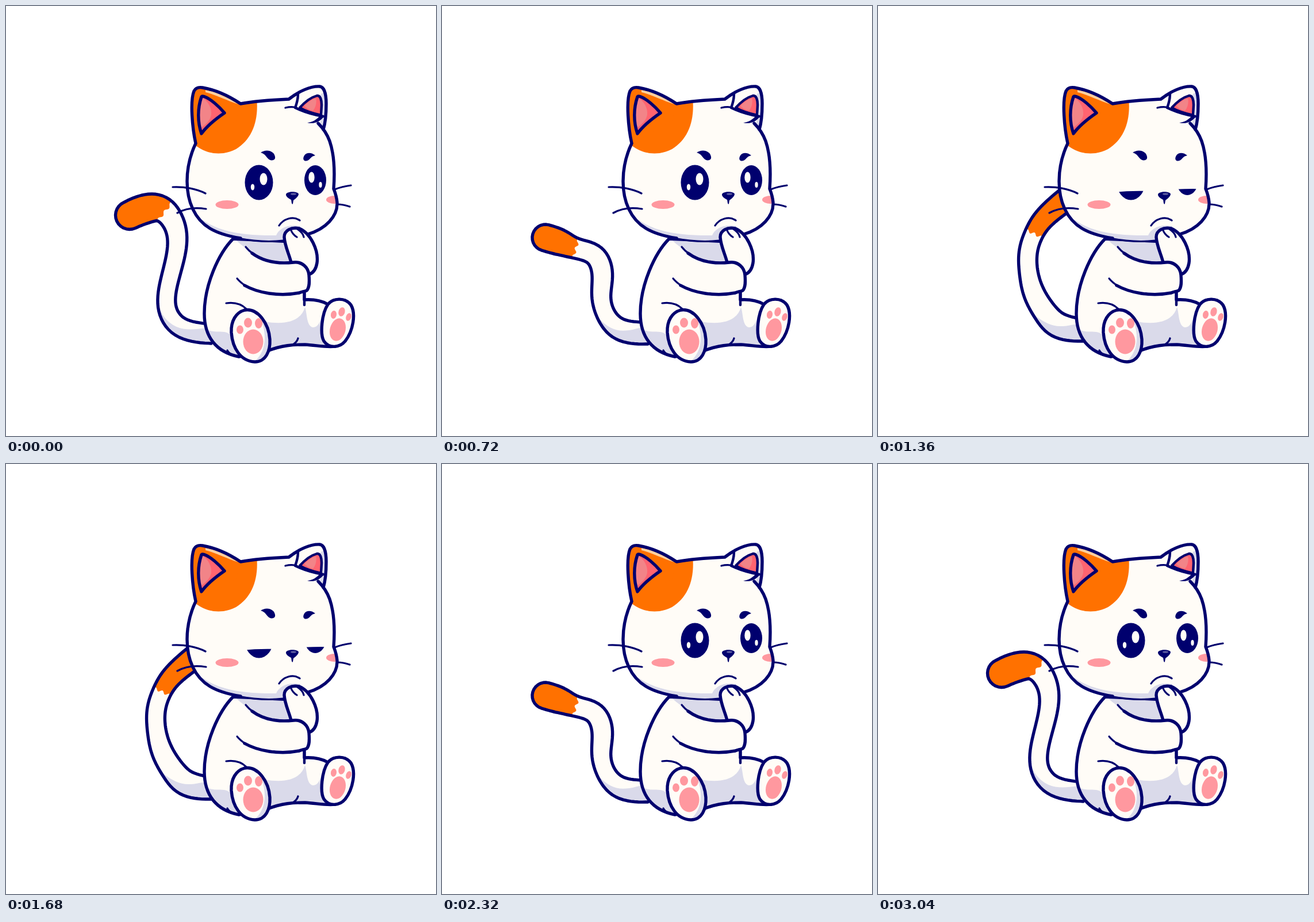
Recreate the animation shown at these times as an HTML page. Size 748 by 748 pixels, loop 3120 ms.

```html
<!DOCTYPE html>
<html lang="en">
<head>
<meta charset="utf-8">
<title>Thinking cat</title>
<style>
  html, body { margin: 0; width: 100%; height: 100%; overflow: hidden; background: #fff; }
  svg { display: block; width: 100vw; height: 100vh; fill: none; stroke-linecap: round; stroke-linejoin: round; }
  .line { stroke: #00006e; stroke-width: 5.4; }
  .mid { stroke-width: 4.4; }
  .thin { stroke-width: 3.2; }
  .fur { fill: #fffcf7; }
  .shade { fill: #dadaea; }
  .orange { fill: #ff7100; }
  .peach { fill: #ffd0a0; }
  .ink { fill: #00006e; }
  .gloss { fill: #5c5ca0; }
  .pink { fill: #ff989f; }
  .rose { fill: #ff6470; }
  .dusk { fill: #f28488; }
</style>
</head>
<body>
<svg viewBox="0 0 748 748">
  <defs>
    <path id="headShape" d="M330 239C319 262 315 285 315 305C315 340 328 371 355 387C390 405 440 411 482 408L525 397C556 388 577 366 576 342C575 330 572 323 570 318C572 290 571 258 563 235C558 221 550 211 543 204L552 193L503 177L508 152C503 156 498 160 492 163C470 163 435 166 408 170Z"/>
    <path id="bodyShape" d="M395 405C370 430 345 485 345 535C345 575 365 602 405 610L455 600C480 590 500 589 520 589C540 590 556 594 573 592L560 519C548 512 535 510 519 511L519 495L500 410Z"/>
    <path id="footShape" d="M415 529C400 533 391 548 392 568C394 595 408 618 433 619C452 619 460 600 459 580C457 552 438 525 415 529Z"/>
    <path id="earInner" d="M340 158C333 178 333 202 340 222C350 208 364 197 380 186C370 174 356 162 346 158C343 157 341 156 340 158Z"/>
    <clipPath id="headClip"><use href="#headShape"/></clipPath>
    <clipPath id="bodyClip"><use href="#bodyShape"/></clipPath>
    <clipPath id="footClip"><use href="#footShape"/></clipPath>
    <clipPath id="lidLeft"><path id="lidLeftShape"/></clipPath>
    <clipPath id="lidRight"><path id="lidRightShape"/></clipPath>
  </defs>

  <g id="tail">
    <path id="tailFur" class="fur"/>
    <path id="tailShade" class="shade"/>
    <path id="tailTip" class="orange"/>
    <path id="tailLine" class="line"/>
  </g>

  <g id="body">
    <use href="#bodyShape" class="fur"/>
    <g clip-path="url(#bodyClip)" class="shade">
      <path d="M396 404C420 425 445 446 500 448L500 400Z"/>
      <path d="M340 556C360 577 384 556 394 578L420 630H340Z"/>
      <path d="M450 549C490 556 514 546 520 524C524 533 522 557 534 559C546 558 545 546 552 538L580 610H440Z"/>
    </g>
    <use href="#bodyShape" class="line"/>
    <path class="line mid" d="M519 497V520"/>
    <path class="line thin" d="M383 517C397 515 409 518 418 527M385 599C387 603 390 605 393 607M499 589C504 586 507 582 508 578"/>
  </g>

  <g id="feet">
    <use href="#footShape" class="fur"/>
    <path class="shade" clip-path="url(#footClip)" d="M440 535C457 575 452 604 428 622H470V535Z"/>
    <use href="#footShape" class="line"/>
    <path class="fur line" d="M560 519C570 507 590 507 600 520C609 535 604 565 590 583C580 595 562 596 553 583C546 571 549 535 560 519Z"/>
    <g class="pink">
      <ellipse cx="430" cy="584" rx="17.5" ry="21.5"/>
      <ellipse cx="407" cy="563" rx="6" ry="7.5"/>
      <ellipse cx="421" cy="551" rx="7" ry="8.5"/>
      <ellipse cx="439.5" cy="552" rx="6.5" ry="9"/>
      <ellipse cx="577" cy="563" rx="13.5" ry="20" transform="rotate(15 577 563)"/>
      <ellipse cx="570" cy="537" rx="5" ry="7" transform="rotate(10 570 537)"/>
      <ellipse cx="584" cy="532" rx="5.5" ry="8" transform="rotate(15 584 532)"/>
      <ellipse cx="596" cy="541" rx="4.5" ry="7" transform="rotate(20 596 541)"/>
    </g>
  </g>

  <g id="head">
    <use href="#headShape" class="fur"/>
    <g clip-path="url(#headClip)">
      <path class="shade" d="M322 352C350 392 410 400 470 399C474 388 490 378 512 383L525 415H310Z"/>
      <path class="orange" d="M436 160C440 200 428 232 400 249C375 262 345 258 325 238L330 160Z"/>
      <ellipse class="pink" cx="572" cy="337" rx="15" ry="7"/>
    </g>

    <path class="orange" d="M330 240C324 212 320 165 327 148C330 142 336 141 342 142C365 146 390 158 408 170L400 200Z"/>
    <path class="peach" d="M347 146C370 150 388 160 404 171C386 165 366 155 347 150Z"/>
    <use href="#earInner" class="rose"/>
    <path class="dusk" d="M342 160C352 166 358 178 357 189C355 200 347 206 339 212C335 196 335 176 342 160Z"/>
    <use href="#earInner" class="line"/>

    <path class="fur" d="M492 162C510 148 530 139 546 140C553 141 557 152 557 170C557 190 555 205 552 215L543 204L552 193L503 177L508 152Z"/>
    <path class="shade" d="M546 156C549 150 553 150 556 154L557 180L552 215L546 203L552 190Z"/>
    <path class="rose line mid" d="M511 177C519 168 530 159 541 156C547 155 549 164 549 172L548 190C534 187 521 183 511 177Z"/>
    <path class="dusk" d="M519 174C526 166 533 162 539 161C541 168 538 178 534 182C528 181 523 178 519 174Z"/>

    <path class="line" d="M330 239C319 262 315 285 315 305C315 340 328 371 355 387C370 396 390 401 408 404M525 397C556 388 577 366 576 342C575 330 572 323 570 318C572 290 571 258 563 235C558 221 550 211 543 204M330 239C324 212 320 165 327 148C330 142 336 141 342 142C365 146 390 158 408 170C435 165 470 163 492 162C510 148 530 139 546 140C553 141 557 152 557 170C557 190 555 205 552 215"/>
    <path class="line thin" d="M404 404C430 409 458 411 482 408M486 177C494 175 500 175 506 177"/>
    <path class="line mid" d="M508 153C508 161 506 169 503 177C518 184 533 189 552 192"/>
    <path class="ink" d="M553 192C547 201 536 206 524 203C533 202 540 198 545 192Z"/>

    <path class="ink" d="M443 255C450 250 460 250 466 257C469 262 469 267 465 268C459 270 455 265 452 261C449 257 446 256 443 255Z"/>
    <path class="ink" d="M538 260C532 255 523 254 519 260C516 265 517 269 521 269.5C526 270 529 265 532 262.5C534 261 536 261 538 260Z"/>

    <g clip-path="url(#lidLeft)">
      <ellipse class="ink" cx="440" cy="307" rx="24.5" ry="30.5"/>
      <ellipse class="fur" cx="448" cy="301" rx="6.5" ry="10.5"/>
      <ellipse class="fur" cx="429" cy="315" rx="3.2" ry="5.5"/>
    </g>
    <g clip-path="url(#lidRight)">
      <ellipse class="ink" cx="538" cy="303" rx="19" ry="26"/>
      <ellipse class="fur" cx="531.5" cy="298" rx="5.2" ry="9.5"/>
      <ellipse class="fur" cx="547" cy="311" rx="2.7" ry="5"/>
    </g>

    <path class="ink" d="M487 328C488 322 507 322 509 327C509 331 503 336 500 338L499 344Q498 346 497 343L496 337C492 335 487 332 487 328Z"/>
    <ellipse class="gloss" cx="500" cy="327" rx="5" ry="1.8"/>
    <path class="line thin" d="M475 382C482 371 499 364 511 373"/>
    <ellipse class="pink" cx="384.5" cy="345.5" rx="20" ry="7.5"/>
    <path class="line thin" d="M290 315C310 314 332 318 347 326M298 360C312 352 330 350 348 353M572 319C582 315 592 313 600 312M577 345C585 345 592 347 598 349"/>
  </g>

  <g id="arms">
    <path class="fur" d="M484 402C484 390 497 385 510 388C530 395 544 425 541 447C539 460 533 465 527 467L497 450C492 430 485 418 484 402Z"/>
    <path class="line" d="M496 446C492 430 485 418 484 402C484 390 497 384 510 387C530 395 544 425 541 447C539 459 533 465 527 467"/>
    <path class="line thin" d="M495 388C497 394 501 399 506 402M508 389C513 392 517 397 518 402"/>
    <path class="fur" d="M420 422C440 442 470 449 500 446C515 443 526 455 527 468C528 480 528 490 523 495C517 498 514 497 510 499C470 506 420 497 402 475Z"/>
    <path class="line" d="M428 430C447 444 473 449 500 446C515 444 526 455 527 468C528 480 528 490 523 495C518 497 514 497 510 499C475 506 438 499 415 486"/>
    <path class="line thin" d="M417 419C420 423 424 427 430 431M402 474C406 479 411 483 417 487"/>
  </g>
</svg>
<script>
  const FRAME = 80, FRAMES = 39, STEPS = 8, TIP_START = 6 * STEPS, SHADE_END = 18;

  // Tail centre line from base to tip: x, y, half width.
  const poses = [
    { at: 320, pts: [[358,570,17],[306,563,17],[279,528,15.5],[283,482,15.5],[295,437,16],[298,392,17.5],[277,355,21],[247,351,25],[215,364,24.5]] },
    { at: 720, pts: [[358,569,19],[313,566,19],[286,540,16],[276,504,16.5],[280,466,18],[267,432,18],[232,422,17],[206,411,22.5],[180,403,23]] },
    { at: 1040, pts: [[358,566,20],[313,563,22],[288,538,21],[273,503,20],[261.5,468,19.5],[249,433,19],[240,401,21],[238,368,26],[241,334,27]] },
    { at: 1360, pts: [[358,564,19],[315,558,22],[290,532,20],[271,500,18.5],[262,465,16],[260.5,429,16],[271,396,16],[291,366,18],[328,336,20]] }
  ];

  const el = id => document.getElementById(id);
  const setPath = (id, d) => el(id).setAttribute('d', d);
  const mix = (a, b, u) => a + (b - a) * u;
  const join = pts => 'M' + pts.map(p => p[0].toFixed(2) + ' ' + p[1].toFixed(2)).join('L');

  // Blend two poses by turning each segment rather than sliding its ends.
  function tailPoints(ms) {
    const time = Math.max(ms, poses[0].at);
    let k = 0;
    while (k < poses.length - 2 && time > poses[k + 1].at) k++;
    const from = poses[k], to = poses[k + 1];
    let u = (time - from.at) / (to.at - from.at);
    if (u > 1) u = 1 + (u - 1) * 0.8;
    const stretch = k === 0 ? 1 + 0.07 * Math.sin(Math.PI * u) : 1;
    const a = from.pts, b = to.pts;
    const pts = [a[0].map((v, j) => mix(v, b[0][j], u))];
    for (let i = 1; i < a.length; i++) {
      const ax = a[i][0] - a[i - 1][0], ay = a[i][1] - a[i - 1][1];
      const bx = b[i][0] - b[i - 1][0], by = b[i][1] - b[i - 1][1];
      const turn = Math.atan2(ax * by - ay * bx, ax * bx + ay * by);
      const angle = Math.atan2(ay, ax) + turn * u;
      const length = mix(Math.hypot(ax, ay), Math.hypot(bx, by), u) * stretch;
      const [px, py] = pts[i - 1];
      pts.push([px + length * Math.cos(angle), py + length * Math.sin(angle), mix(a[i][2], b[i][2], u)]);
    }
    return pts;
  }

  // Catmull-Rom spline through the points
  function spline(pts) {
    const out = [], last = pts.length - 1;
    for (let i = 0; i < last; i++) {
      const p = pts[Math.max(i - 1, 0)], q = pts[i], r = pts[i + 1], s = pts[Math.min(i + 2, last)];
      for (let n = 0; n < STEPS; n++) {
        const t = n / STEPS;
        out.push(q.map((v, j) => v + t / 2 * (r[j] - p[j] +
          t * (2 * p[j] - 5 * v + 4 * r[j] - s[j] + t * (3 * (v - r[j]) + s[j] - p[j])))));
      }
    }
    out.push(pts[last]);
    return out;
  }

  // Running average that keeps both ends in place
  function soften(pts, reach) {
    return pts.map((p, i) => {
      const r = Math.min(reach, i, pts.length - 1 - i);
      const near = pts.slice(i - r, i + r + 1);
      return p.map((_, j) => near.reduce((sum, q) => sum + q[j], 0) / near.length);
    });
  }

  function drawTail(ms) {
    const mid = soften(spline(tailPoints(ms)), 4), last = mid.length - 1;
    const dirs = mid.map((_, i) => {
      const a = mid[Math.max(i - 1, 0)], b = mid[Math.min(i + 1, last)];
      const d = Math.hypot(b[0] - a[0], b[1] - a[1]);
      return [(b[0] - a[0]) / d, (b[1] - a[1]) / d];
    });
    // side: 1 is the outer edge, -1 the inner one; along shifts toward the tip
    const edge = (i, side, along = 0) => {
      const [x, y, w] = mid[i], [dx, dy] = dirs[i];
      return [x + dy * w * side + dx * along, y - dx * w * side + dy * along];
    };
    const outer = mid.map((_, i) => edge(i, 1)), inner = mid.map((_, i) => edge(i, -1));
    const cap = [];
    for (let n = 1; n < 14; n++) {
      const a = Math.PI * n / 14;
      cap.push(edge(last, Math.cos(a), mid[last][2] * Math.sin(a)));
    }
    const outline = join([...outer, ...cap, ...inner.slice().reverse()]);
    const wave = [];
    for (let n = 0; n <= 20; n++) wave.push(edge(TIP_START, n / 10 - 1, 2.5 * Math.sin(n / 4 * Math.PI)));
    const shadeTop = [];
    for (let i = SHADE_END; i >= 0; i--) shadeTop.push(edge(i, 1.75 * i / SHADE_END - 0.75));

    setPath('tailFur', outline);
    setPath('tailLine', outline);
    setPath('tailTip', join([...outer.slice(TIP_START), ...cap, ...inner.slice(TIP_START).reverse(), ...wave]) + 'Z');
    setPath('tailShade', join([...outer.slice(0, SHADE_END + 1), ...shadeTop]) + 'Z');
  }

  function drawLids(ms) {
    const drop = ms <= 960 ? -15 : Math.min((ms - 960) * 0.1125, 54);
    const lid = (x, y, tilt) => `M${x - 30} ${y + tilt}Q${x} ${y - 1} ${x + 30} ${y}V350H${x - 30}Z`;
    setPath('lidLeftShape', lid(440, 277 + drop, 2));
    setPath('lidRightShape', lid(538, 277 + drop * 0.92, 1));
  }

  function draw(now) {
    const frame = Math.floor(now / FRAME) % FRAMES;
    const ms = Math.min(frame, FRAMES - 1 - frame) * FRAME; // plays forward, then back
    drawTail(ms);
    drawLids(ms);
  }

  let start;
  function tick(now) {
    start ??= now;
    draw(now - start);
    requestAnimationFrame(tick);
  }
  draw(0);
  requestAnimationFrame(tick);
</script>
</body>
</html>
```
